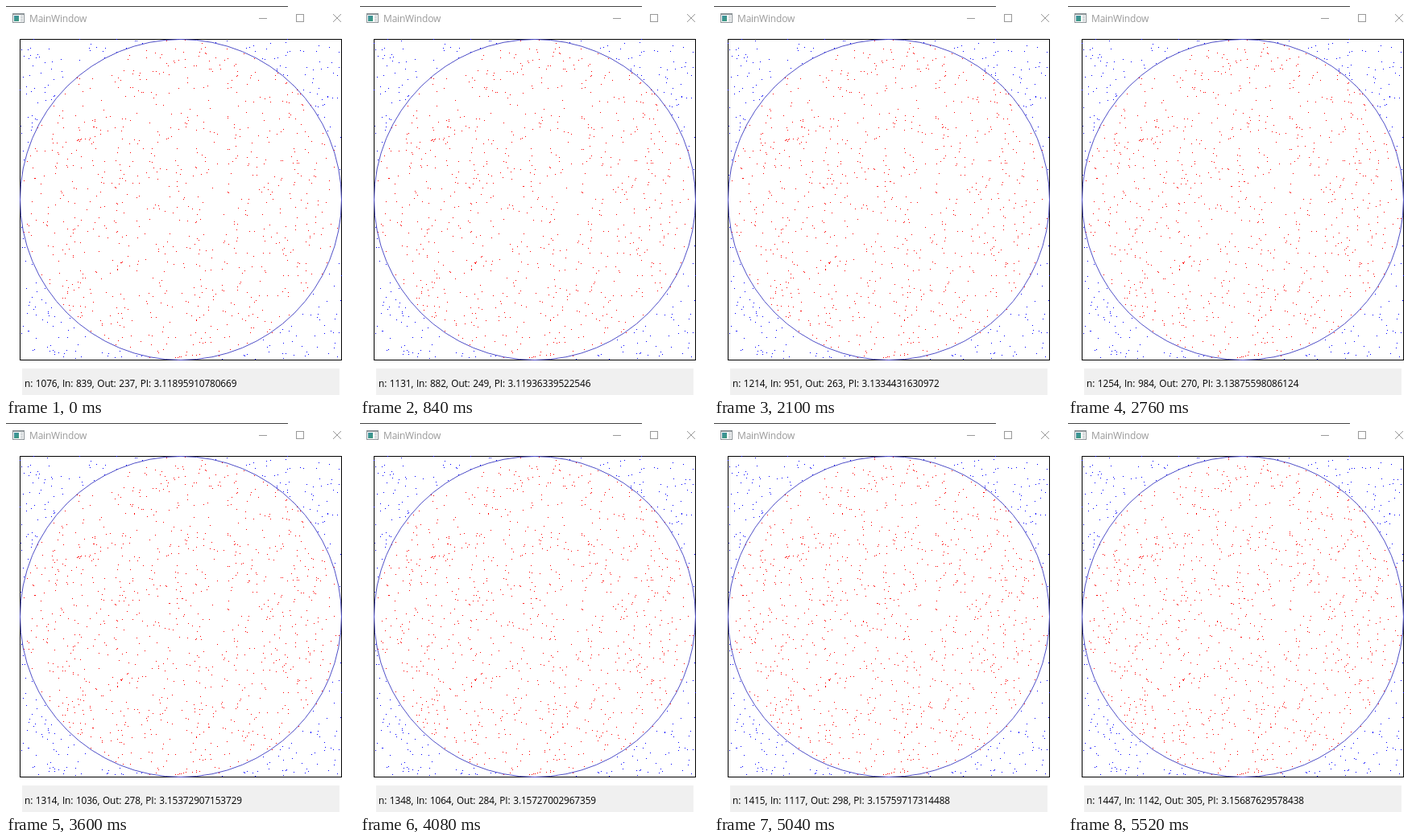
An HTML page with a canvas for the animation above (5.58 s loop, 432 by 484 pixels).

```html
<!DOCTYPE html>
<html lang="en">
<head>
<meta charset="utf-8">
<title>MainWindow</title>
<style>
  html, body { margin: 0; width: 432px; height: 484px; overflow: hidden; background: #fff; }
  canvas { position: absolute; left: 0; top: 0; }
  div { position: absolute; line-height: 16px; white-space: pre; font-family: "Open Sans", "Noto Sans", sans-serif; }
  #title { left: 29px; top: 8px; font-size: 12px; letter-spacing: -.2px; color: #999; }
  #label { left: 23px; top: 461px; font-size: 11.8px; letter-spacing: -.1px; word-spacing: .7px; color: #000; }
</style>
</head>
<body>
<canvas id="stage" width="432" height="484"></canvas>
<div id="title">MainWindow</div>
<div id="label"></div>
<script>
const STEP = 60, STEPS = 93, SIZE = 400, LEFT = 17, TOP = 41;
const ctx = document.getElementById('stage').getContext('2d');
const label = document.getElementById('label');

// Running totals: step, all points, points inside the circle
const totals = [
  [0, 1076, 839], [14, 1131, 882], [24, 1174, 917], [46, 1254, 984],
  [60, 1314, 1036], [77, 1387, 1095], [92, 1447, 1142]
];

let seed = 20177;
function random() {
  seed = (seed + 0x6D2B79F5) | 0;
  let t = Math.imul(seed ^ (seed >>> 15), 1 | seed);
  t = (t + Math.imul(t ^ (t >>> 7), 61 | t)) ^ t;
  return ((t ^ (t >>> 14)) >>> 0) / 4294967296;
}

const inside = [], outside = [];
while (inside.length < 1142 || outside.length < 305) {
  const x = Math.floor(random() * SIZE), y = Math.floor(random() * SIZE);
  const hit = Math.hypot(x - SIZE / 2, y - SIZE / 2) <= SIZE / 2;
  (hit ? inside : outside).push([LEFT + x, TOP + y]);
}

function countsAt(step) {
  const i = Math.max(1, totals.findIndex(k => k[0] >= step));
  const a = totals[i - 1], b = totals[i];
  const p = (step - a[0]) / (b[0] - a[0]);
  return [1, 2].map(j => Math.round(a[j] + (b[j] - a[j]) * p));
}

function rect(color, x, y, w, h) {
  ctx.fillStyle = color;
  ctx.fillRect(x, y, w, h);
}

function line(color, ...points) {
  ctx.strokeStyle = color;
  ctx.beginPath();
  points.forEach(([x, y]) => ctx.lineTo(x, y));
  ctx.stroke();
}

function drawWindow() {
  rect('#fff', 0, 0, 432, 484);
  rect('#444', 0, 0, 350, 1);

  // Application icon
  rect('#8a9296', 8, 9, 15, 12);
  rect('#fff', 9, 11, 13, 9);
  const shade = ctx.createLinearGradient(9, 11, 16, 20);
  shade.addColorStop(0, '#3f8fa8');
  shade.addColorStop(1, '#3b9a78');
  rect(shade, 10, 12, 6, 7);
  for (let y = 12; y < 19; y += 2) rect('#b4bcc0', 18, y, 3, 1);

  // Window buttons
  rect('#999', 314, 15, 10, 1);
  ctx.strokeStyle = '#999';
  ctx.strokeRect(360.5, 10.5, 9, 9);
  line('#999', [406, 10], [416, 20]);
  line('#999', [416, 10], [406, 20]);

  rect('#f0f0f0', 20, 451, 394, 33);
}

function drawDots(dots, count, color) {
  ctx.fillStyle = color;
  for (let i = 0; i < count; i++) ctx.fillRect(dots[i][0], dots[i][1], 1, 1);
}

function draw(step) {
  const [n, hits] = countsAt(step);
  drawWindow();
  ctx.strokeStyle = '#000';
  ctx.strokeRect(LEFT + .5, TOP + .5, SIZE - 1, SIZE - 1);
  drawDots(inside, hits, '#f00');
  drawDots(outside, n - hits, '#00f');
  ctx.strokeStyle = '#5050c8';
  ctx.beginPath();
  ctx.arc(LEFT + SIZE / 2, TOP + SIZE / 2, SIZE / 2 - .5, 0, Math.PI * 2);
  ctx.stroke();
  const pi = +(4 * hits / n).toPrecision(15);
  label.textContent = `n: ${n}, In: ${hits}, Out: ${n - hits}, PI: ${pi}`;
}

const start = performance.now();
let shown = -1;
function tick() {
  const step = Math.floor((performance.now() - start) / STEP) % STEPS;
  if (step !== shown) draw(shown = step);
  requestAnimationFrame(tick);
}
tick();
</script>
</body>
</html>
```
